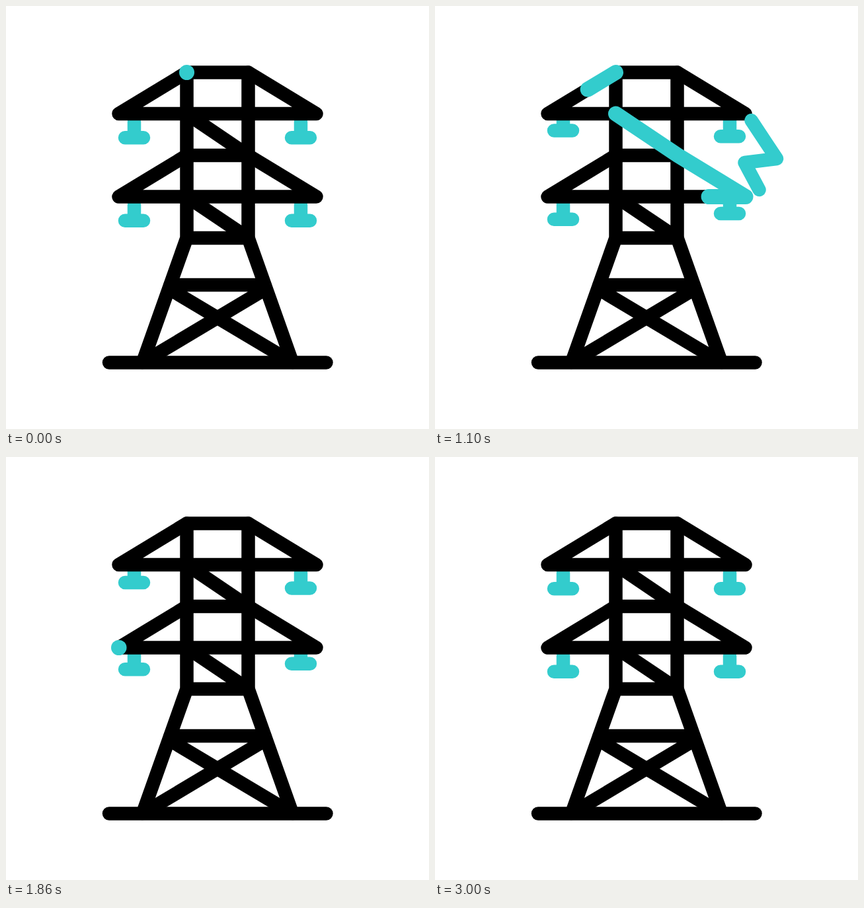
An HTML page that plays this animation: 640x640 px, repeating every 3.02 s.

```html
<!DOCTYPE html>
<html lang="en">
<head>
<meta charset="utf-8">
<title>Power tower</title>
<style>
  html, body { margin: 0; width: 100%; height: 100%; overflow: hidden; background: #fff; }
  svg { display: block; width: 100vw; height: 100vh; }
  path { fill: none; stroke: #000; stroke-width: 20.5; stroke-linecap: round; stroke-linejoin: round; }
  .teal path { stroke: #33cccd; }
  .wire path { stroke-width: 23; }
  .trim { visibility: hidden; }
</style>
</head>
<body>
<svg viewBox="0 0 640 640">
  <defs>
    <path id="insulator" d="M0-23.8V0M-14 0H14"/>
    <path id="half" d=""/>
  </defs>

  <g class="teal" id="insulators"></g>

  <g>
    <path d="M170.5 163L273.5 100.5H366.5L469.5 163Z"/>
    <path d="M273.5 226L170.5 288.5H469.5L366.5 226Z"/>
    <path d="M206.8 539L273.5 351V100.5M433.2 539L366.5 351V100.5M273.5 351H366.5"/>
    <path d="M273.5 163L366.5 226M273.5 288.5L366.5 351"/>
    <path d="M248.5 422H391.5M252 431L430 537.3M388 431L210 537.3"/>
    <path d="M156 539.5H484.5"/>
  </g>

  <g class="teal wire" id="wires">
    <path class="trim" d="M273.5 100.5H367.5L470 163H170.5L273.5 100.5"/>
    <path class="trim" d="M273.5 163L367.5 226L470 288.5H170.5"/>
  </g>

  <g class="teal" id="bolts"></g>
</svg>

<script>
const LOOP = 3020;
const SVG = 'http://www.w3.org/2000/svg';
const byId = id => document.getElementById(id);

function addPath(parent, d) {
  const path = document.createElementNS(SVG, 'path');
  path.setAttribute('d', d);
  parent.appendChild(path);
  return path;
}

// Smooth 0..1 progress of t through a span.
function ease(t, start, length) {
  const u = Math.min(1, Math.max(0, (t - start) / length));
  return u * u * (3 - 2 * u);
}

// Show only the stretch of a path between two distances.
function trim(path, length, from, to) {
  const a = Math.max(0, from);
  const b = Math.min(length, to);
  path.style.visibility = b > a ? 'visible' : 'hidden';
  if (b <= a) return;
  path.style.strokeDasharray = `${b - a} ${length + 1}`;
  path.style.strokeDashoffset = -a;
}

// Insulators bob three times, one after another.
const insulators = [[194, 199.3], [446, 199.3], [194, 324.7], [446, 324.7]].map(([x, y], i) => ({
  x, y, start: i * 200,
  el: addPath(byId('insulators'), 'M0-23.8V0M-14 0H14')
}));

function bob(t, start) {
  const local = t - start;
  if (local <= 0 || local >= 2400) return 0;
  const phase = local % 800;
  return -12.8 * (ease(phase, 0, 400) - ease(phase, 400, 400));
}

// The two wires share one continuous run of current.
const wires = [...byId('wires').children].map(el => ({ el, length: el.getTotalLength() }));
const wireTotal = wires.reduce((sum, w) => sum + w.length, 0);

// Lightning bolts: start point, horizontal and vertical scale, start time.
const BOLT = [[0, 0], [38.5, 58], [-10, 64], [12, 105]];
const bolts = [
  [161, 296, -0.72, 0.72, 460],
  [478.5, 173, 1, 1, 900],
  [302, 184, 0.7, 0.7, 1460]
].map(([x, y, sx, sy, start]) => {
  const el = addPath(byId('bolts'), 'M' + BOLT.map(([px, py]) => [x + px * sx, y + py * sy]).join('L'));
  return { el, start, length: el.getTotalLength() };
});

function draw(t) {
  for (const { el, x, y, start } of insulators) {
    el.setAttribute('transform', `translate(${x} ${y + bob(t, start)})`);
  }

  const head = ease(t, 0, 1560) * wireTotal;
  const tail = ease(t, 320, 1560) * wireTotal;
  let offset = 0;
  for (const { el, length } of wires) {
    trim(el, length, tail - offset, head - offset);
    offset += length;
  }

  for (const { el, start, length } of bolts) {
    trim(el, length, ease(t, start + 200, 200) * length, ease(t, start, 200) * length);
  }
}

const begin = performance.now();
function tick() {
  draw((performance.now() - begin) % LOOP);
  requestAnimationFrame(tick);
}
tick();
</script>
</body>
</html>
```
